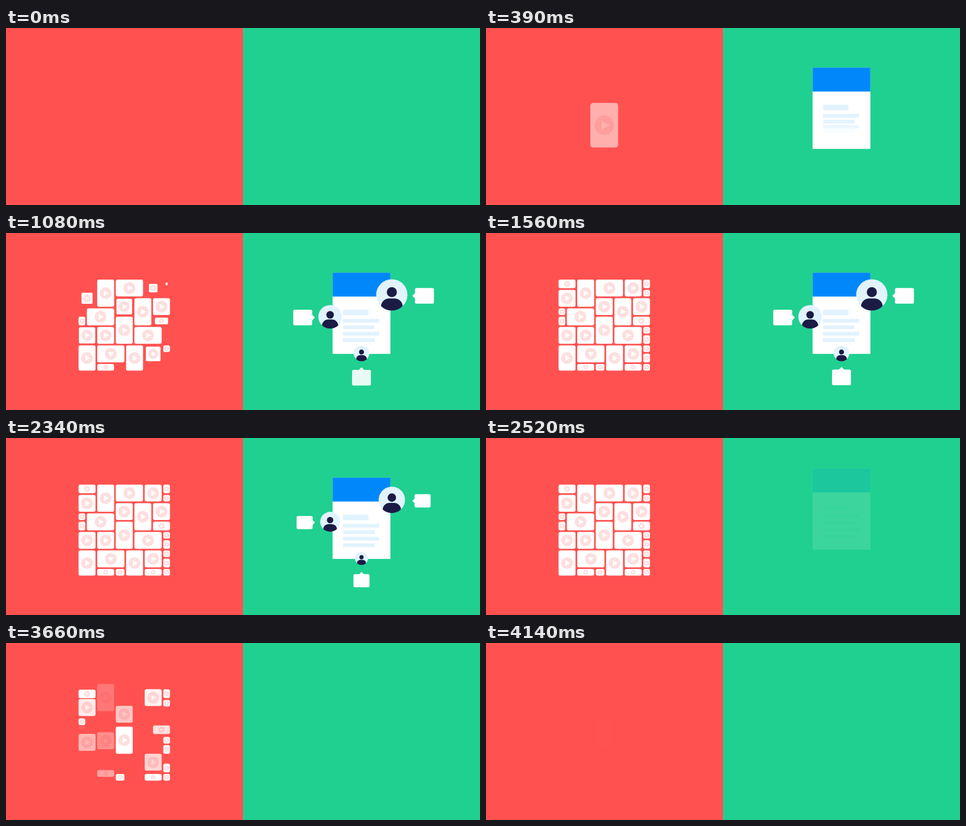
An HTML page that plays this animation: 800 px wide and 300 px high, repeating every 4.52 s.

```html
<!DOCTYPE html>
<html lang="en">
<head>
<meta charset="utf-8">
<title>Video wall and document</title>
<style>
  html, body { margin: 0; width: 100%; height: 100%; overflow: hidden; background: #ff5250; }
  svg { display: block; width: 800px; height: 300px; }
</style>
</head>
<body>
<svg id="stage" viewBox="0 0 800 300" xmlns="http://www.w3.org/2000/svg">
  <defs><clipPath id="disc"><circle r="1"/></clipPath></defs>
  <rect width="400" height="300" fill="#ff5250"/>
  <rect x="400" width="400" height="300" fill="#20d090"/>
</svg>
<script>
const LOOP = 4520;
const stage = document.getElementById('stage');

const add = (parent, name, attrs = {}) => {
  const node = document.createElementNS('http://www.w3.org/2000/svg', name);
  for (const key in attrs) node.setAttribute(key, attrs[key]);
  return parent.appendChild(node);
};
const progress = (t, start, duration) => Math.min(1, Math.max(0, (t - start) / duration));
const easeOut = (p, power = 2) => 1 - (1 - p) ** power;
const easeIn = p => p * p;

function place(node, x, y, scale, opacity) {
  const visible = scale > 0.001 && opacity > 0.001;
  node.setAttribute('display', visible ? 'inline' : 'none');
  node.setAttribute('transform', `translate(${x} ${y}) scale(${scale})`);
  node.setAttribute('opacity', opacity);
}

// Each letter covers the cells of one tile; tiles appear and leave in letter order.
const HERO = '@';
const WALL = [
  'XXKKFFFSST',
  'RRKKFFFSSa',
  'RRKKOOBBGG',
  'WAAAOOBBGG',
  'JAAA@@BBQQ',
  'NNLL@@CCCZ',
  'NNLL@@CCCU',
  'HHDDDEEPPI',
  'HHDDDEEPPb',
  'HHMMYEEVVc'
];
const GAP = 2.8, WIDE = 17.4, NARROW = 14;

// Cells come in pairs, one wide and one narrow; columns left of the centre pair put the narrow one first.
const edge = (i, first) => Math.floor(i / 2) * (WIDE + NARROW) + (i % 2) * first;
const columnEdge = i => 122.5 + edge(i, i < 4 ? NARROW : WIDE);
const rowEdge = i => 79 + edge(i, WIDE);

function makeTile(letter) {
  const rows = WALL.filter(row => row.includes(letter));
  const top = WALL.indexOf(rows[0]);
  const x = columnEdge(rows[0].indexOf(letter)), y = rowEdge(top);
  const w = columnEdge(rows[0].lastIndexOf(letter) + 1) - GAP - x;
  const h = rowEdge(top + rows.length) - GAP - y;

  const node = add(stage, 'g');
  add(node, 'rect', { x: -w / 2, y: -h / 2, width: w, height: h, rx: 3, fill: '#fff' });
  const turn = letter === 'D' ? 90 : 0;
  const icon = add(node, 'g', { transform: `rotate(${turn}) scale(${Math.min(w, h) * 0.35})` });
  add(icon, 'circle', { r: 1, fill: '#fddfdf' });
  add(icon, 'path', { d: 'M-.3-.48 .54 0-.3 .48Z', fill: '#fff' });
  return { node, x: x + w / 2, y: y + h / 2 };
}
const letters = [...new Set(WALL.join(''))].filter(c => c !== HERO).sort();
const tiles = letters.map(makeTile);
const hero = makeTile(HERO);

const page = add(stage, 'g');
add(page, 'rect', { x: 551.2, y: 67.2, width: 97.6, height: 137.7, fill: '#fff' });
add(page, 'rect', { x: 551.2, y: 67.2, width: 97.6, height: 40.5, fill: '#0088fa' });
const addLine = (y, width, height) => add(page, 'rect', { x: 569, y, width, height, fill: '#e1f3fe' });
const lines = [addLine(130, 42.6, 9.4)];
for (let i = 0; i < 4; i++) lines.push(addLine(145.6 + 11 * i, i % 2 ? 53.3 : 60.8, 6.2));

// A bubble points with its tip at a person and extends in the given direction.
const people = [
  { x: 651.2, y: 104.8, r: 26.6, tip: [685.7, 106.5], direction: [1, 0] },
  { x: 547, y: 142, r: 20, tip: [521.4, 143.3], direction: [-1, 0] },
  { x: 600, y: 204, r: 13.3, tip: [600, 226.9], direction: [0, 1] }
];

function makeAvatar({ r }) {
  const node = add(stage, 'g');
  const face = add(node, 'g', { transform: `scale(${r})`, 'clip-path': 'url(#disc)' });
  add(face, 'circle', { r: 1, fill: '#e1f3fe' });
  add(face, 'circle', { cy: -0.17, r: 0.32, fill: '#1b1b46' });
  add(face, 'rect', { x: -0.69, y: 0.23, width: 1.38, height: 1.2, rx: 0.52, fill: '#1b1b46' });
  return node;
}

function makeBubble({ direction: [dx, dy] }) {
  const node = add(stage, 'g', { fill: '#fff' });
  const w = 32, h = 26.4, tip = 4.6;
  const cx = dx * (tip + w / 2), cy = dy * (tip + h / 2);
  add(node, 'rect', { x: cx - w / 2, y: cy - h / 2, width: w, height: h, rx: 2.5 });
  const bx = dx * 5, by = dy * 5;
  add(node, 'path', { d: `M0 0L${bx + dy * 5} ${by + dx * 5}L${bx - dy * 5} ${by - dx * 5}Z` });
  return node;
}
for (const person of people) person.avatar = makeAvatar(person);
for (const person of people) person.bubble = makeBubble(person);

function drawTile({ node, x, y }, t, index, scale, opacity) {
  const out = easeIn(progress(t, 3160 + index * 23.5, 300));
  place(node, x, y - 12 * out, scale, opacity * (1 - out));
}

function drawWall(t) {
  tiles.forEach((tile, i) => {
    drawTile(tile, t, i, easeOut(progress(t, 515 + i * 28, 300), 3), 1);
  });
  const enter = progress(t, 15, 700);
  drawTile(hero, t, tiles.length, 4 - 3 * easeOut(enter), enter);
}

function drawPage(t) {
  const enter = progress(t, 15, 300), out = progress(t, 2345, 200);
  place(page, 0, 46 * (1 - easeOut(enter)) - 20 * easeIn(out), 1, enter * (1 - out));
  lines.forEach((line, i) => {
    const p = easeOut(progress(t, 130 + i * 60, 200));
    place(line, 0, -10 * (1 - p), 1, p);
  });
}

function drawPeople(t) {
  const shrink = 1 - progress(t, 2310, 200);
  people.forEach(({ x, y, tip, direction, avatar, bubble }, i) => {
    place(avatar, x, y, easeOut(progress(t, 555 + i * 90, 250)) * shrink, 1);
    const p = easeOut(progress(t, 750 + i * 90, 220));
    const slide = 5 * (1 - p);
    place(bubble, tip[0] + direction[0] * slide, tip[1] + direction[1] * slide, shrink, p);
  });
}

const begin = performance.now();
function render() {
  const t = (performance.now() - begin) % LOOP;
  drawWall(t);
  drawPage(t);
  drawPeople(t);
  requestAnimationFrame(render);
}
render();
</script>
</body>
</html>
```
